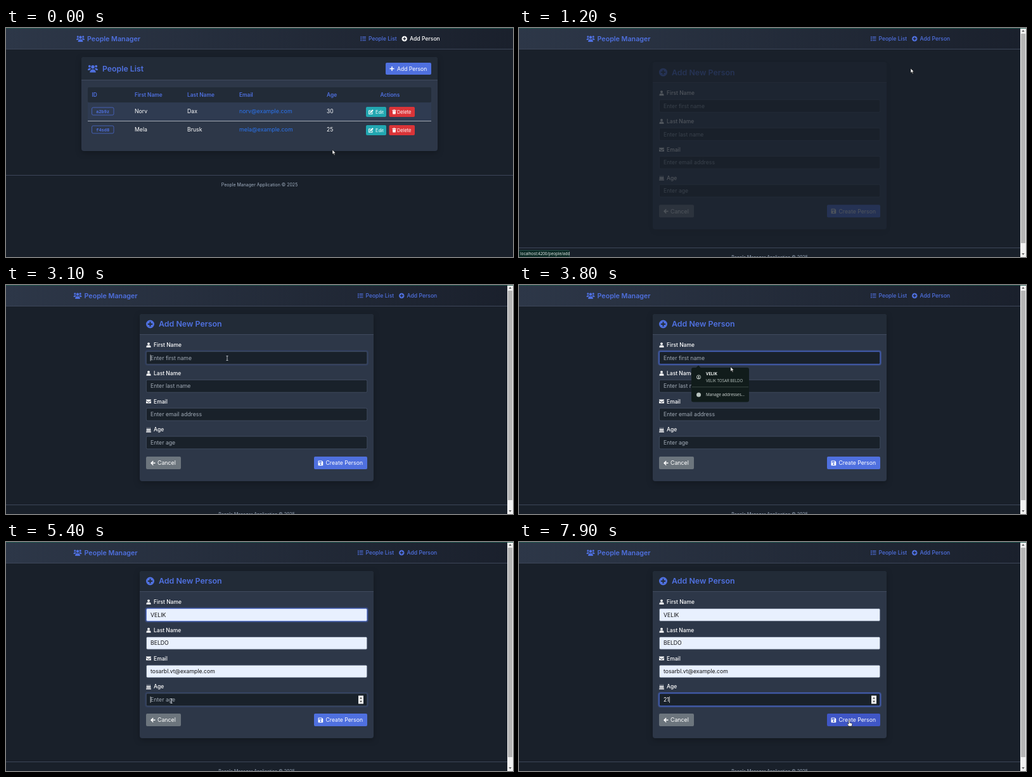
Animation of 800x363 px, one loop 8 s. Source, as an HTML page:

```html
<!DOCTYPE html>
<html lang="en">
<head>
<meta charset="utf-8">
<title>People Manager</title>
<style>
  html, body { margin: 0; width: 100%; height: 100%; overflow: hidden; background: #19202a; }
  svg { display: block; width: 800px; height: 363px; font-family: Inter, sans-serif; }
  .card { filter: drop-shadow(0 3px 5px rgba(0, 0, 0, .25)); }
</style>
</head>
<body>
<svg id="stage" viewBox="0 0 800 363" xmlns="http://www.w3.org/2000/svg"></svg>
<script>
const LOOP = 8000;
const BLUE = '#4f70df', DEEP_BLUE = '#3f56c6', WHITE = '#fff', LINE = '#465166';
const PANEL = '#2d3748', HEAD = '#222b37', FIELD = '#19212a', FILLED = '#e8f0fe';
const PERSON = { first: 'VELIK', last: 'BELDO', full: 'VELIK TOSAR BELDO', email: 'tosarbl.vt@example.com' };

// Icons live on a 16 x 16 grid.
const disc = (x, y, r) => `M${x - r} ${y}a${r} ${r} 0 1 0 ${2 * r} 0a${r} ${r} 0 1 0 ${-2 * r} 0z`;
const ICONS = {
  users: disc(8, 5.2, 2.7) + disc(2.8, 4.2, 1.9) + disc(13.2, 4.2, 1.9) +
    'M3.2 14a4.8 5 0 0 1 9.6 0zM0 10.5a3 3.4 0 0 1 4.6-3l.5 1a6 6 0 0 0-2.2 2zM16 10.5a3 3.4 0 0 0-4.6-3l-.5 1a6 6 0 0 1 2.2 2z',
  user: disc(8, 4.2, 3.9) + 'M1 16v-2.500a4.500 4.500 0 0 1 4.500-4.500h5a4.500 4.500 0 0 1 4.500 4.500V16z',
  list: 'M0 1.500h3v3H0zM0 6.500h3v3H0zM0 11.500h3v3H0zM5 2h11v2H5zM5 7h11v2H5zM5 12h11v2H5z',
  plus: 'M6.500 1h3v5.500H15v3H9.500V15h-3V9.500H1v-3h5.500z',
  plusDisc: disc(8, 8, 8) + 'M6.800 3.500v3.300H3.500v2.400h3.300v3.300h2.400V9.200h3.300V6.800H9.200V3.500z',
  mail: 'M1 2h14q1 0 1 1v1.500L8 10 0 4.500V3q0-1 1-1zM0 6.300l8 5.500 8-5.500V13q0 1-1 1H1q-1 0-1-1z',
  cake: 'M2.500 3h2v4h-2zM7 3h2v4H7zM11.500 3h2v4h-2zM3.500 0l1 2h-2zM8 0l1 2H7zM12.500 0l1 2h-2zM2 7h12q1 0 1 1v2.200q-2 1.500-3.500 0-1.700 1.500-3.500 0-1.700 1.500-3.500 0-1.500 1.500-3.500 0V8q0-1 1-1zM1 12q2 1 3.500 0 1.700 1 3.500 0 1.700 1 3.500 0 1.500 1 3.500 0v2h1v2H0v-2h1z',
  back: 'M8 1l2 2-3.600 3.600H15v2.800H6.400L10 13l-2 2-7-7z',
  save: 'M2 1h9.500L15 4.500V14q0 1-1 1H2q-1 0-1-1V2q0-1 1-1zM3 3v3.500h8V3zM8 8.500a2.300 2.300 0 1 0 .01 0z',
  edit: 'M1 3h7L6 5H2.500v8.500H11V10l2-2v7.500H1q-.8 0-.8-1V4q0-1 .8-1zM12.500.5l3 3-7.500 7.500-3.500.5.500-3.500z',
  trash: 'M5.500 0h5l1 1H15v2.500H1V1h3.500zM2 4.500h12L13 16H3z'
};

const icon = (name, x, cy, size, fill, attrs = '') =>
  `<path d="${ICONS[name]}" fill="${fill}" fill-rule="${name === 'users' ? 'nonzero' : 'evenodd'}" ` +
  `transform="translate(${x} ${cy - size / 2}) scale(${size / 16})" ${attrs}/>`;
const rect = (x, y, w, h, fill, attrs = '') =>
  `<rect x="${x}" y="${y}" width="${w}" height="${h}" fill="${fill}" ${attrs}/>`;
const text = (str, x, cy, size, fill, weight = 400, attrs = '') =>
  `<text x="${x}" y="${cy + size * .36}" font-size="${size}" fill="${fill}" font-weight="${weight}" ${attrs}>${str}</text>`;
const button = (x, y, w, h, fill, id = '') => rect(x, y, w, h, fill, `rx="2" ${id && `id="${id}"`}`);

const card = (x, y, w, h, headH) =>
  `<g class="card">${rect(x, y, w, h, PANEL, 'rx="4"')}</g>` +
  `<path d="M${x} ${y + headH}v${4 - headH}q0-4 4-4h${w - 8}q4 0 4 4v${headH - 4}z" fill="${HEAD}"/>` +
  rect(x, y + headH, w, .8, LINE);

function navBar() {
  return rect(0, 0, 800, 33, 'url(#navFill)') + rect(0, 33, 800, .8, LINE) +
    `<g id="navItems">` +
    icon('users', 111, 17, 13, BLUE) + text('People Manager', 128, 17, 10.7, BLUE, 600) +
    icon('list', 559.5, 17, 8.5, BLUE) + text('People List', 572, 17, 8.5, BLUE, 500) +
    `<g id="navAdd" fill="#fff">` + icon('plusDisc', 624.5, 17, 8.5, 'inherit') +
    text('Add Person', 637, 17, 8.6, 'inherit', 500) + `</g></g>`;
}

function footer(y) {
  return rect(0, y, 800, .8, LINE) +
    text('People Manager Application © 2025', 400, y + 15.5, 7, '#a0aec0', 400, 'text-anchor="middle"');
}

function tableRow(cy, id, first, last, email, age) {
  return rect(135.500, cy - 5.500, 34.500, 12, 'none', `rx="2" stroke="${BLUE}" stroke-width=".7"`) +
    text(id, 152.700, cy + .5, 7, BLUE, 700, 'text-anchor="middle" font-family="Liberation Mono, monospace"') +
    text(first, 203, cy, 8.700, WHITE) + text(last, 286, cy, 8.700, WHITE) +
    text(email, 368, cy, 8.900, '#2a73ee') + text(age, 506, cy, 8.500, WHITE) +
    button(568, cy - 6.500, 32, 16, '#22a7b1') + icon('edit', 572, cy + 1.500, 8, WHITE) +
    text('Edit', 583, cy + 1.500, 7.300, WHITE) +
    button(604.500, cy - 6.500, 40.500, 16, '#da3438') + icon('trash', 609, cy + 1.500, 7, WHITE) +
    text('Delete', 617, cy + 1.500, 7.400, WHITE);
}

function listPage() {
  const heads = [['ID', 135.500], ['First Name', 203], ['Last Name', 286], ['Email', 368], ['Age', 506], ['Actions', 590.500]];
  return card(119, 46, 562, 149, 36) +
    icon('users', 129, 64.500, 16, BLUE) + text('People List', 152, 64.500, 12.300, BLUE, 600) +
    button(599, 55, 72, 19, BLUE, 'addButton') + icon('plus', 605, 64.500, 8, WHITE) +
    text('Add Person', 617, 64.500, 8.600, WHITE) +
    rect(129, 94, 542, 24, HEAD, 'rx="2"') +
    heads.map(([label, x]) => text(label, x, 106, 8.400, BLUE, 600)).join('') +
    rect(129, 118, 542, 29, '#2f3b51') + rect(129, 147, 542, .8, '#c3c9d1') +
    tableRow(131.500, 'a2b9z', 'Norv', 'Dax', 'norv@example.com', '30') +
    tableRow(160.500, 'f4sd8', 'Mela', 'Brusk', 'mela@example.com', '25') +
    footer(233);
}

const FIELDS = [
  ['First Name', 'user', 'Enter first name', PERSON.first],
  ['Last Name', 'user', 'Enter last name', PERSON.last],
  ['Email', 'mail', 'Enter email address', PERSON.email],
  ['Age', 'cake', 'Enter age', '']
];
const fieldY = i => 115.500 + i * 44.800;

function formField([label, glyph], i) {
  const cy = fieldY(i);
  return icon(glyph, 221, cy - 20.500, 8, WHITE) + text(label, 233, cy - 20.500, 8.500, WHITE, 500) +
    rect(220.300, cy - 11, 350.500, 22, 'none', `rx="3" stroke="${BLUE}" stroke-width="2" opacity="0" id="ring${i}"`) +
    rect(221.400, cy - 9.900, 348.400, 19.800, FIELD, `rx="2" stroke="${LINE}" stroke-width=".8" id="box${i}"`) +
    text('', 228, cy, 8.700, WHITE, 400, `id="value${i}"`);
}

function formPage() {
  return `<g id="form">` + card(211, 46, 369, 265, 32) +
    icon('plusDisc', 221, 62, 13, BLUE) + text('Add New Person', 241, 62, 12.400, BLUE, 600) +
    FIELDS.map(formField).join('') +
    `<g id="spinner">${rect(556, 243.500, 8, 13, '#f0f0f0')}<path d="M558 248.500l2-2.500 2 2.500zM558 251.800l2 2.500 2-2.500z" fill="#444"/></g>` +
    `<rect id="caret" width=".7" height="10"/>` +
    button(221, 272, 55, 20, '#6c757d') + icon('back', 227.500, 282.300, 8.500, WHITE) + text('Cancel', 239, 282.300, 8.800, WHITE) +
    button(486, 272, 84, 20, BLUE, 'createButton') + icon('save', 492, 282.300, 8.800, WHITE) +
    text('Create Person', 504.500, 282.300, 8.700, WHITE) + `</g>` +
    `<g transform="translate(-4.500 0)">${footer(348)}</g>` +
    rect(791, 0, 9, 363, '#f1f1f1') + rect(792, 9, 7, 332, '#b5b5b5') +
    `<path d="M793.300 6l2.200-3 2.200 3zM793.300 357l2.200 3 2.200-3z" fill="#666"/>`;
}

function suggestions() {
  const font = 'font-family="Open Sans, sans-serif"';
  return `<g id="menu"><path d="M279 131.500l4-4 4 4z" fill="#111c1b"/>` +
    rect(272, 131, 91, 54.500, '#111c1b', 'rx="3"') +
    rect(273.500, 132.500, 88, 27.500, '#253431', 'rx="2" id="menuHover"') +
    rect(273, 161.500, 89, .6, '#52605c') +
    `<circle cx="283.500" cy="146" r="3.200" fill="none" stroke="#c9d2cf" stroke-width=".8"/>` +
    `<path d="${disc(283.500, 145, 1.100)}M281.500 148.300a2 1.700 0 0 1 4 0z" fill="#c9d2cf"/>` +
    text(PERSON.first, 295, 141, 6.400, '#f0f4f2', 700, font) +
    text(PERSON.full, 295, 151.300, 6.200, '#b9c4c0', 400, font) +
    `<circle cx="283.500" cy="174" r="3.500" fill="#b9c4c0"/>` +
    text('Manage addresses...', 295, 174, 6.400, '#d5dcda', 400, font) + `</g>`;
}

function pointer() {
  const ink = 'fill="#fff" stroke="#111" stroke-width=".6" stroke-linejoin="round"';
  return `<g id="pointer">` +
    `<path id="arrow" ${ink} d="M0 0v7.200l1.700-1.500 1.200 2.700 1.200-.5-1.200-2.700h2.300z"/>` +
    `<path id="hand" ${ink} d="M-.9.600a.9.900 0 0 1 1.800 0v3l3 .7q1 .3.900 1.300l-.6 3.400H-.8L-3 5.800q-.3-1 .7-1l1.400 1z"/>` +
    `<path id="beam" fill="none" stroke="#d5dae0" stroke-width=".8" d="M-1.500-3.500h3M-1.500 3.500h3M0-3.500v7"/></g>`;
}

const stage = document.getElementById('stage');
stage.innerHTML =
  `<defs><linearGradient id="navFill"><stop stop-color="#2d3748"/><stop offset="1" stop-color="#1a202c"/></linearGradient></defs>` +
  rect(0, 0, 800, 363, '#19202a') + navBar() +
  `<g id="listPage">${listPage()}</g><g id="formPage">${formPage()}</g>` + suggestions() +
  rect(0, 0, 800, .9, '#1f5c50') +
  `<g id="status">${rect(-2, 352.500, 81.500, 13, '#0b2a25', 'rx="2" stroke="#2a5a50" stroke-width=".7"')}` +
  text('localhost:4200/people/add', 2, 358, 6.300, '#eef4f2', 400, 'font-family="Open Sans, sans-serif"') + `</g>` + pointer();

const $ = id => document.getElementById(id);
const show = (id, on) => $(id).setAttribute('display', on ? 'inline' : 'none');
const set = (id, name, value) => $(id).setAttribute(name, value);
const clamp = v => Math.min(1, Math.max(0, v));
const ramp = (t, start, length) => clamp((t - start) / length);
const smooth = p => p * p * (3 - 2 * p);

// CSS "ease", solved by bisection.
function ease(p) {
  const bez = (s, a, b) => 3 * s * (1 - s) ** 2 * a + 3 * s * s * (1 - s) * b + s ** 3;
  let lo = 0, hi = 1;
  for (let i = 0; i < 20; i++) {
    const mid = (lo + hi) / 2;
    if (bez(mid, .25, .25) < p) lo = mid; else hi = mid;
  }
  return bez(lo, .1, 1);
}

const CLICK = { add: 900, page: 1100, first: 3050, fill: 4600, age: 5350 };
const TYPED = [[6500, '2'], [6900, '21']];
// Each move: start, end, target.
const MOVES = [[50, 680, 618, 64], [1900, 2850, 349, 116], [3400, 4250, 316, 146], [4650, 5300, 261, 252], [7250, 7850, 521, 283]];

function pointerAt(t) {
  let x = 515, y = 193;
  for (const [start, end, tx, ty] of MOVES) {
    const p = smooth(ramp(t, start, end - start));
    x += (tx - x) * p;
    y += (ty - y) * p;
  }
  return [x, y];
}

const inside = ([x, y], left, top, w, h) => x >= left && x <= left + w && y >= top && y <= top + h;

function drawFields(t, preview, filled, hoverAge) {
  const age = TYPED.filter(([at]) => t >= at).map(([, str]) => str).pop() || '';
  const focus = [ramp(t, CLICK.first, 150) * (1 - ramp(t, CLICK.age, 150)), 0, 0, ramp(t, CLICK.age, 150)];
  FIELDS.forEach(([, , hint, value], i) => {
    const auto = i < 3 && (preview || filled);
    const content = i === 3 ? age : auto ? value : '';
    const node = $('value' + i);
    node.textContent = content || hint;
    set('value' + i, 'fill', auto ? '#111' : content ? WHITE : '#a0aab6');
    set('value' + i, 'font-size', preview && auto ? 7.100 : 8.700);
    set('value' + i, 'font-family', preview && auto ? 'Liberation Sans, sans-serif' : 'Inter, sans-serif');
    set('box' + i, 'fill', auto ? FILLED : FIELD);
    set('box' + i, 'stroke', focus[i] > .5 ? BLUE : LINE);
    set('ring' + i, 'opacity', focus[i] * .45);
  });
  show('spinner', hoverAge || t >= CLICK.age);

  const onAge = t >= CLICK.age;
  const since = TYPED.map(([at]) => at).concat(CLICK.first, CLICK.age).filter(at => at <= t);
  const blinkOn = since.length && Math.floor((t - Math.max(...since)) / 500) % 2 === 0;
  show('caret', blinkOn);
  const row = onAge ? 3 : 0;
  const width = onAge && age ? $('value3').getComputedTextLength() + .4
    : !onAge && filled ? $('value0').getComputedTextLength() + .4 : -.3;
  set('caret', 'x', 228 + width);
  set('caret', 'y', fieldY(row) - 5);
  set('caret', 'fill', !onAge && (preview || filled) ? '#111' : WHITE);
}

function draw(t) {
  const pos = pointerAt(t);
  const onForm = t >= CLICK.page;
  show('listPage', !onForm);
  show('formPage', onForm);
  set('navItems', 'transform', `translate(${onForm ? -4.500 : 0} 0)`);
  set('navAdd', 'fill', t >= CLICK.add ? BLUE : WHITE);

  const enter = ease(ramp(t, 1115, 500));
  set('form', 'opacity', enter);
  set('form', 'transform', `translate(0 ${10.600 * (1 - enter)})`);

  const overAdd = !onForm && inside(pos, 599, 55, 72, 19);
  const overCreate = onForm && inside(pos, 486, 272, 84, 20);
  const overField = FIELDS.findIndex((_, i) => onForm && inside(pos, 221, fieldY(i) - 10, 349, 20));
  set('addButton', 'fill', overAdd ? DEEP_BLUE : BLUE);
  set('createButton', 'fill', overCreate ? DEEP_BLUE : BLUE);
  set('status', 'opacity', ramp(t, 630, 220) * (1 - ramp(t, 1500, 200)));

  const menuOpen = t >= 3200 && t < CLICK.fill;
  const overItem = menuOpen && inside(pos, 272, 131, 91, 30);
  show('menu', menuOpen);
  show('menuHover', overItem);
  drawFields(t, overItem, t >= CLICK.fill, overField === 3);

  const kind = overAdd || overCreate ? 'hand' : overField >= 0 && !overItem ? 'beam' : 'arrow';
  ['arrow', 'hand', 'beam'].forEach(id => show(id, id === kind));
  set('pointer', 'transform', `translate(${pos[0]} ${pos[1]})`);
}

const startTime = performance.now();
function tick() {
  draw((performance.now() - startTime) % LOOP);
  requestAnimationFrame(tick);
}
tick();
</script>
</body>
</html>
```
